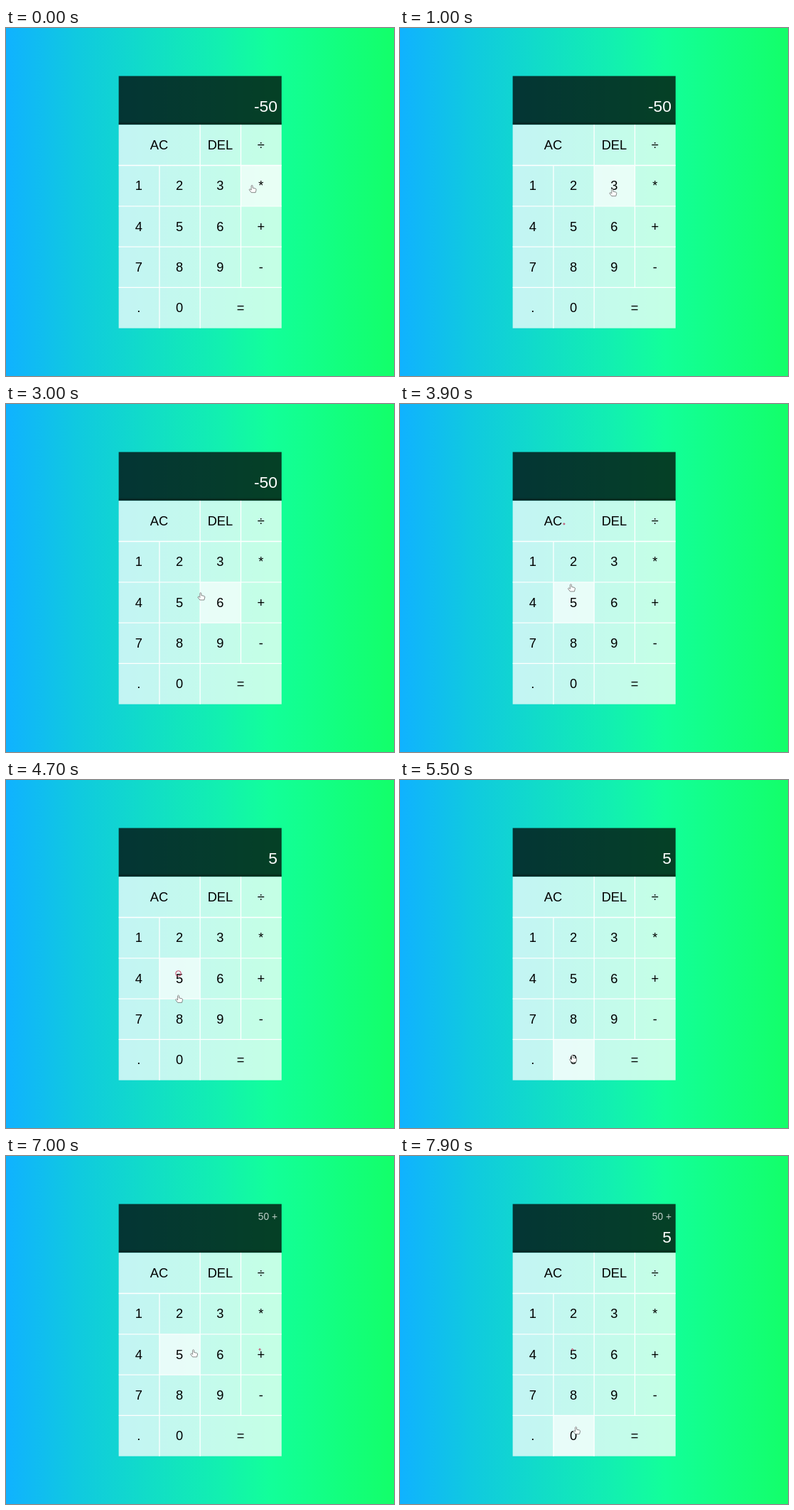
These frames come from a looping animation (546 by 490 pixels, 8 s). An HTML page:

```html
<!DOCTYPE html>
<html lang="en">
<head>
<meta charset="utf-8">
<title>Calculator</title>
<style>
  html, body { margin: 0; width: 100%; height: 100%; overflow: hidden; }
  body {
    background: linear-gradient(to right, rgb(16,178,255), rgb(16,201,224) 18%,
      rgb(18,240,176) 55%, rgb(18,255,154) 68%, rgb(19,255,105));
  }
  svg { display: block; }
  text { font-family: "Liberation Sans", Arial, sans-serif; }
  .key { fill: #fff; fill-opacity: .75; }
  .key.hover { fill-opacity: .9; }
  .edge { fill: none; stroke: #fff; stroke-width: 1.3; }
  .label { font-size: 18.3px; text-anchor: middle; }
  .out { fill: #fff; text-anchor: end; }
</style>
</head>
<body>
<svg width="546" height="490" viewBox="0 0 546 490">
  <rect x="158.6" y="67.6" width="229.2" height="68.6" fill-opacity=".75"/>
  <rect x="158.6" y="132.5" width="229.2" height="3.7" fill-opacity=".2"/>
  <text id="previous" class="out" x="382" y="89.5" font-size="13.75" fill-opacity=".75"></text>
  <text id="current" class="out" x="382" font-size="22.9"></text>
  <g id="keys"></g>
  <circle id="ring" fill="none" stroke="#c23258"/>
  <path id="hand" fill="#fff" stroke="#555" stroke-width=".7" stroke-linejoin="round"
    d="M-1 6V1Q0-.6 1 1V4L5 5Q6 5.3 6 6.5L5 10.5H-1L-4 6.5Q-3.2 5-2 6L-1 7Z"/>
</svg>
<script>
const LOOP = 8000, STEP = 100, GLIDE = 700;
const CELL = 57.3, LEFT = 158.6, TOP = 136.2;
const $ = id => document.getElementById(id);

function add(tag, attrs, text = "") {
  const el = document.createElementNS("http://www.w3.org/2000/svg", tag);
  set(el, attrs);
  el.textContent = text;
  return $("keys").appendChild(el);
}

function set(el, attrs) {
  for (const name in attrs) el.setAttribute(name, attrs[name]);
}

const keys = {};
["AC AC DEL ÷", "1 2 3 *", "4 5 6 +", "7 8 9 -", ". 0 = ="].forEach((row, r) => {
  const labels = row.split(" ");
  labels.forEach((label, c) => {
    if (labels[c - 1] === label) return;
    const x = LEFT + c * CELL, y = TOP + r * CELL;
    const width = CELL * (labels[c + 1] === label ? 2 : 1);
    const el = add("rect", { x, y, width, height: CELL, class: "key" });
    const top = r ? `M${x} ${y}h${width}` : "", side = c ? `M${x} ${y}v${CELL}` : "";
    add("path", { d: top + side, class: "edge" });
    add("text", { x: x + width / 2 - .4, y: y + 34.7, class: "label" }, label);
    keys[label] = { el, x, y, width };
  });
});

// Where the fingertip rests: key, arrival time, offset from the key's centre
const stops = [
  { key: "*", at: 0, dx: -13, dy: -1 },
  { key: "3", at: 900, wait: 2600, dx: -3, dy: 4 },
  { key: "6", at: 3000, dx: -28, dy: -14 },
  { key: "AC", at: 3300, tap: 3450, dx: 15, dy: 4 },
  { key: "5", at: 4200, tap: 4350 },
  { key: "0", at: 5300, tap: 5750 },
  { key: "-", at: 6100, dx: -26, dy: 13 },
  { key: "+", at: 6500, tap: 6550 },
  { key: "5", at: 7300, tap: 7450 },
  { key: "0", at: 7900, dx: 3, dy: -13 }
].map(({ dx = -2, dy = -7, ...stop }) => {
  const { x, y, width } = keys[stop.key];
  return {
    ...stop,
    leave: stop.tap || stop.wait || stop.at,
    x: x + width / 2 + dx,
    y: y + CELL / 2 + dy
  };
});

function pointerAt(t) {
  const next = stops.findIndex(s => s.at > t);
  if (next < 0) return stops[stops.length - 1];
  const a = stops[next - 1], b = stops[next];
  const start = Math.max(a.leave, b.at - GLIDE);
  const p = Math.max(0, (t - start) / (b.at - start));
  const k = 1 - (1 - p) ** 2;
  return { x: a.x + (b.x - a.x) * k, y: a.y + (b.y - a.y) * k };
}

function press({ previous, current }, key) {
  if (key === "AC") return { previous: "", current: "" };
  if (key === "+") return { previous: current + " +", current: "" };
  return { previous, current: current + key };
}

function draw(now) {
  const t = Math.floor(now % LOOP / STEP) * STEP;
  const { x, y } = pointerAt(t);
  set($("hand"), { transform: `translate(${x} ${y})` });
  for (const key of Object.values(keys)) {
    const dx = x - key.x, dy = y - key.y;
    key.el.classList.toggle("hover", dx >= 0 && dx < key.width && dy >= 0 && dy < CELL);
  }

  const taps = stops.filter(s => s.tap <= t);
  const { previous, current } = taps.reduce((state, s) => press(state, s.key),
    { previous: "", current: "-50" });
  $("previous").textContent = previous;
  $("current").textContent = current;
  set($("current"), { y: previous ? 121.6 : 117.6 });

  const last = taps.pop();
  const r = last ? Math.max(0, 13.6 - (t - last.tap) * .028) : 0;
  set($("ring"), { r, cx: last ? last.x : 0, cy: last ? last.y : 0 });
  requestAnimationFrame(draw);
}
requestAnimationFrame(draw);
</script>
</body>
</html>
```
